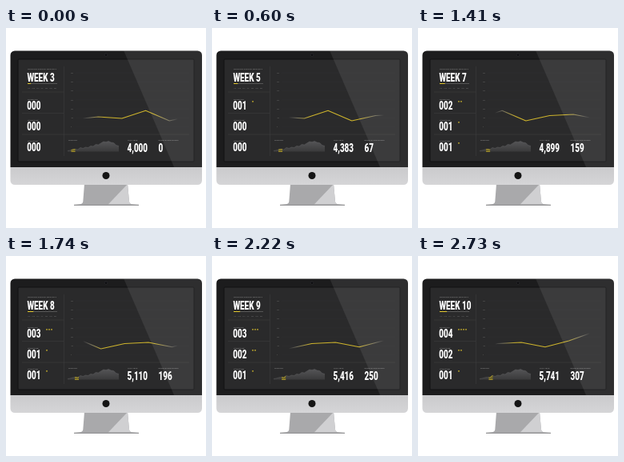
An HTML page that plays this animation: 250 by 250 pixels, repeating every 2760 ms.

```html
<!DOCTYPE html>
<html lang="en">
<head>
<meta charset="utf-8">
<title>Dashboard</title>
<style>
  html, body { margin: 0; width: 100%; height: 100%; overflow: hidden; background: #fff; }
  svg { display: block; width: 100vw; height: 100vh; }
  text { font-family: Roboto, "Liberation Sans", sans-serif; }
  .big { font-size: 15px; font-weight: 800; fill: #fff; }
  .tiny { font-size: 2.5px; font-weight: 500; fill: #8b8b8b; }
  .micro { font-size: 1.7px; fill: #777; }
</style>
</head>
<body>
<svg viewBox="0 0 250 250">
  <defs>
    <linearGradient id="metal" x1="0" y1="0" x2="0" y2="1">
      <stop offset="0" stop-color="#cacacc"/>
      <stop offset="1" stop-color="#d5d5d7"/>
    </linearGradient>
    <linearGradient id="shade" x1="0" y1="0" x2="0" y2="1">
      <stop offset="0" stop-color="#555557"/>
      <stop offset="1" stop-color="#3a3a3b"/>
    </linearGradient>
    <linearGradient id="fade" gradientUnits="userSpaceOnUse" x1="96" y1="0" x2="215" y2="0">
      <stop offset="0" stop-color="#888" stop-opacity="0"/>
      <stop offset=".09" stop-color="#8a8468" stop-opacity=".8"/>
      <stop offset=".22" stop-color="#cdb32b"/>
      <stop offset=".75" stop-color="#cdb32b"/>
      <stop offset=".9" stop-color="#8a8468" stop-opacity=".8"/>
      <stop offset="1" stop-color="#888" stop-opacity="0"/>
    </linearGradient>
    <clipPath id="plot"><rect x="96" y="54" width="119" height="76"/></clipPath>
    <clipPath id="now"><rect id="nowBox" y="138" width="5" height="20"/></clipPath>
    <clipPath id="glass"><path d="M5.500 174V34a5.500 5.500 0 0 1 5.500-5.500h228.500a5.500 5.500 0 0 1 5.500 5.500v140z"/></clipPath>
  </defs>

  <path d="M98 195h54l2 22q.3 3 4 3.300l8 .7v1h-81v-1l7-.7q4-.3 4.300-3.300z" fill="#a9a9ab"/>
  <path d="M152 195l2 22q.3 3 4 3.300h-30z" fill="#d0d0d2"/>
  <path d="M85 221.300h81" stroke="#8f8f91"/>
  <path d="M5.500 173.500h239.500v17a5.500 5.500 0 0 1-5.500 5.500h-228.500a5.500 5.500 0 0 1-5.500-5.500z" fill="url(#metal)"/>
  <circle cx="125" cy="184.500" r="4.500" fill="#151515"/>

  <g clip-path="url(#glass)">
    <rect x="4" y="27" width="242" height="148" fill="#1c1c1d"/>
    <circle cx="125" cy="33.700" r="1.800" fill="#0e0e10" stroke="#333336" stroke-width=".5"/>
    <rect x="15" y="39" width="220" height="128" rx="1" fill="#2a2a2b" stroke="#111112" stroke-width="1"/>
    <path d="M72.500 48v112M20 80h52M20 106.500h52M20 133h209" fill="none" stroke="#3d3d3e" stroke-width=".6"/>
    <g id="grid"></g>

    <text class="tiny" x="27" y="52.300">SUMMARY FOR THE YEAR 2013</text>
    <rect x="27" y="69" width="37" height="1" fill="#555"/>
    <rect id="bar" x="27" y="69" height="1" fill="#e0c52c"/>
    <g id="months"></g>
    <g id="rows"></g>

    <path id="line" fill="none" stroke="url(#fade)" stroke-width="1.100" stroke-linejoin="round" clip-path="url(#plot)"/>

    <text class="tiny" x="78" y="141">SIGN UPS</text>
    <g id="spark"></g>
    <text class="tiny" x="152" y="141">THIS YEAR</text>
    <text class="tiny" x="190.500" y="141">NEWSLETTER SIGNUP</text>
    <g id="totals"></g>

    <path d="M147 28h100v147h-36.500z" fill="#fff" opacity=".08"/>
  </g>
</svg>
<script>
const NS = "http://www.w3.org/2000/svg";
const LOOP = 2760, STEP = 30, LAST = LOOP - STEP;
const $ = id => document.getElementById(id);

function add(parent, tag, attrs, text) {
  const el = document.createElementNS(NS, tag);
  for (const k in attrs) el.setAttribute(k, attrs[k]);
  if (text) el.textContent = text;
  return parent.appendChild(el);
}

// Condensed display type
const big = (x, y) => add($("totals"), "text",
  { class: "big", transform: `translate(${x} ${y}) scale(.66 1)` });

const weekText = big(26.5, 67);
const yearText = big(151.5, 154.5);
const newsText = big(190.5, 154.5);

// Chart axis
for (let i = 0; i < 7; i++) {
  const y = 56 + i * 11.3;
  add($("grid"), "text", { class: "micro", x: 81, y: y + .6 }, String(600 - i * 100));
  add($("grid"), "path", { d: `M87 ${y}H229`, stroke: "#323233", "stroke-width": .4 });
}

"JAN MAR MAY JUL SEP NOV DEC".split(" ").forEach((m, i) =>
  add($("months"), "text", { class: "micro", x: 27 + i * 5.5, y: 75.8 }, m));

// Left column counters, each with its row of dots
const rows = [["PRODUCTS", 4], ["SUBMITTED", 2], ["PUBLISHED", 1]].map(([label, max], i) => {
  const y = 102.3 + i * 26, g = $("rows");
  add(g, "text", { class: "tiny", x: 27, y: y - 12.6 }, label);
  const text = big(26.3, y);
  const dots = Array.from({ length: max }, (_, k) =>
    add(g, "circle", { cx: 51 + k * 3, cy: y - 10.4, r: .8, fill: "#e0c52c" }));
  return { max, text, dots };
});

// Small area chart with a lit section
const heights = [0, .5, 1.5, 2, 1.5, 4, 3, 4.5, 4, 6, 5.5, 8, 7.5, 9.5, 11.5, 11, 12, 10.5, 10, 7, 6];
const edge = heights.map((h, i) => `${77 + i * 3.2} ${153.5 - h}`).join("L");
add($("spark"), "path", { d: `M${edge}V154.500H77Z`, fill: "url(#shade)" });
add($("spark"), "path", { d: "M" + edge, fill: "none", stroke: "#5c5c5e", "stroke-width": .5 });
add($("spark"), "path", { d: `M${edge}V154.500H77Z`, fill: "#6f6528", stroke: "#d5bb2b", "stroke-width": .6, "clip-path": "url(#now)" });

const values = [114, 111, 113, 103.3, 116, 109.5, 108, 113.7, 106, 95.5, 91];

function draw(t) {
  const p = t / LAST;
  const week = 3 + 7 * p;
  weekText.textContent = "WEEK " + Math.min(10, Math.round(week + .2));
  yearText.textContent = Math.round(4000 + 1741 * p).toLocaleString("en-US");
  newsText.textContent = Math.round(307 * p);
  $("bar").setAttribute("width", 37 * week / 52 + 2);
  $("nowBox").setAttribute("x", 81.5 + 7 * p);
  for (const { max, text, dots } of rows) {
    const n = Math.round(max * p);
    text.textContent = String(n).padStart(3, "0");
    dots.forEach((d, i) => d.setAttribute("visibility", i < n ? "visible" : "hidden"));
  }
  const left = 85.5 - 134.5 * p;
  $("line").setAttribute("d", "M" + values.map((v, i) => `${left + i * 29.7} ${v}`).join("L"));
}

const start = performance.now();
function tick() {
  const t = (performance.now() - start) % LOOP;
  draw(Math.floor(t / STEP) * STEP);
  requestAnimationFrame(tick);
}
draw(0);
requestAnimationFrame(tick);
</script>
</body>
</html>
```
